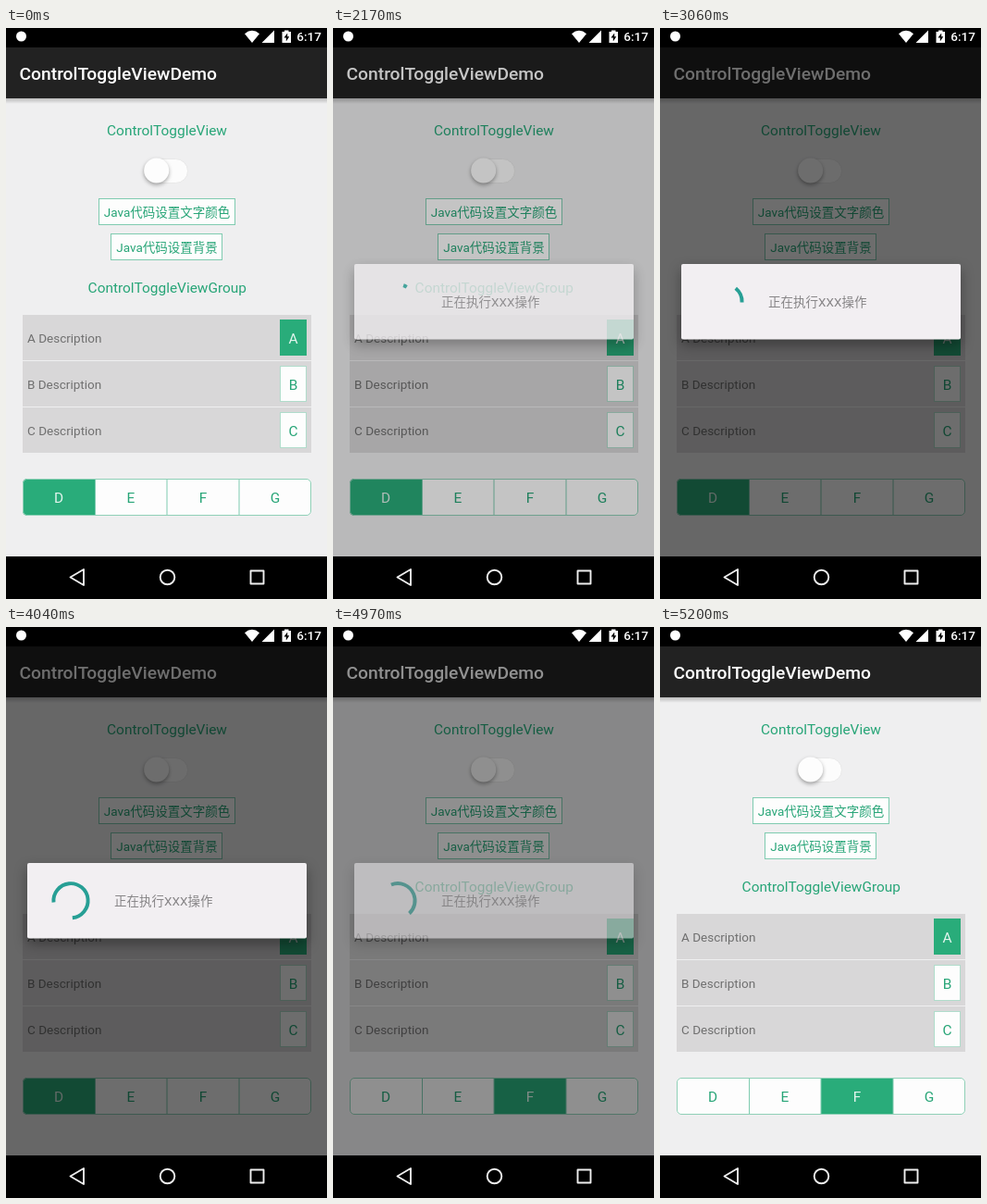
An HTML page that plays this animation: 347 px wide and 617 px high, repeating every 7.81 s.

```html
<!DOCTYPE html>
<html lang="en">
<head>
<meta charset="utf-8">
<title>Toggle demo</title>
<style>
  html, body { margin: 0; width: 100%; height: 100%; overflow: hidden; background: #000; }
  svg { display: block; width: 347px; height: 617px; }
  text { font: 13.5px Roboto, "Noto Sans CJK SC", "Noto Sans CJK", sans-serif; white-space: pre; }
  .big { font-size: 15.43px; }
  .mid { text-anchor: middle; }
  .green { fill: #27a577; }
  .edge { fill: #fdfdfd; stroke: #7fcbb0; }
  .pale { stroke: #b0dccb; }
  .thumb { filter: drop-shadow(0 2px 2px rgba(0, 0, 0, .35)); }
  .card { filter: drop-shadow(0 6px 7px rgba(0, 0, 0, .35)); }
</style>
</head>
<body>
<svg viewBox="0 0 347 617">
  <defs>
    <linearGradient id="fade" x2="0" y2="1">
      <stop stop-color="#000" stop-opacity=".22"/>
      <stop offset="1" stop-color="#000" stop-opacity="0"/>
    </linearGradient>
    <clipPath id="round"><rect x="18" y="487" width="312" height="40" rx="5"/></clipPath>
  </defs>

  <!-- page -->
  <rect width="347" height="617" fill="#efeff0"/>
  <rect y="76" width="347" height="6" fill="url(#fade)"/>
  <rect y="21" width="347" height="55" fill="#222"/>
  <text x="14.5" y="55.5" fill="#fff" style="font-size:19.28px;font-weight:500">ControlToggleViewDemo</text>
  <text class="big mid green" x="174" y="116">ControlToggleView</text>
  <rect x="148.5" y="141.5" width="48" height="26" rx="13" fill="#fcfcfc" stroke="#e8e8e8"/>
  <circle class="thumb" cx="162.7" cy="154" r="13.5" fill="#fdfdfd"/>
  <rect class="edge" x="100.5" y="184.500" width="147" height="28"/>
  <text class="mid green" x="174" y="203.500">Java代码设置文字颜色</text>
  <rect class="edge" x="113.5" y="222.500" width="120" height="28"/>
  <text class="mid green" x="174" y="241.500">Java代码设置背景</text>
  <text class="big mid green" x="174.3" y="286.3">ControlToggleViewGroup</text>
  <g id="rows"></g>
  <g id="tabs" clip-path="url(#round)"></g>
  <rect x="18.5" y="487.5" width="311" height="39" rx="4.5" fill="none" stroke="#8fd0b7"/>

  <!-- dialog -->
  <rect id="dim" y="21" width="347" height="550"/>
  <g id="dialog">
    <rect class="card" x="23" y="255" width="302" height="81.5" rx="2" fill="#f2eff2"/>
    <circle id="arc" cx="70" cy="295.7" r="18.6" pathLength="360" fill="none"
      stroke="#279f95" stroke-width="3.9"/>
    <text x="117" y="300.7" fill="#868486">正在执行XXX操作</text>
  </g>

  <!-- system bars -->
  <rect width="347" height="21"/>
  <rect y="571" width="347" height="46"/>
  <g fill="#fff">
    <circle cx="16.5" cy="9" r="5.5"/>
    <path d="M258 6.2Q266 -.5 274 6.2L266 16Z"/>
    <path d="M290 2.5V16H276.5Z"/>
    <path d="M298.5 4H301V2.5H305.5V4H308V16H298.5Z"/>
    <path d="M304.2 5.5L300.5 10.5H302.8V14.5L306.3 9.2H304.2Z" fill="#000"/>
    <text x="314.3" y="14" style="font-weight:500">6:17</text>
  </g>
  <g fill="none" stroke="#eee" stroke-width="1.9" stroke-linejoin="round" transform="translate(.5 -.5)">
    <path d="M69 594L83.5 585.5V602.5Z"/>
    <circle cx="174" cy="594" r="7.8"/>
    <rect x="264" y="587" width="14" height="14"/>
  </g>
</svg>

<script>
const LOOP = 7810, PRESS = 1970, RELEASE = 2060, OPEN = 2105, SWITCH = 4910, CLOSE = 4925;
const CYCLE = 1333, GREEN = '#29ac7a', WHITE = '#fdfdfd';
const $ = id => document.getElementById(id);
const clamp = x => Math.min(1, Math.max(0, x));

$('rows').innerHTML = [...'ABC'].map((name, i) => {
  const y = 310 + i * 50, on = i === 0;
  return `<rect x="18" y="${y}" width="312" height="49" fill="#d8d7d8"/>
    <text x="23" y="${y + 30}" fill="#707070">${name} Description</text>
    <rect class="edge pale" x="296.5" y="${y + 5.5}" width="28" height="38"
      ${on ? `style="fill:${GREEN};stroke:${GREEN}"` : ''}/>
    <text class="big mid" x="310.5" y="${y + 30.5}" fill="${on ? '#e4f5ee' : '#27a577'}">${name}</text>`;
}).join('');

$('tabs').innerHTML = [...'DEFG'].map((name, i) => {
  const x = 18 + i * 78;
  return `<g><rect x="${x}" y="487" width="78" height="40"/>
    <text class="big mid" x="${x + 39}" y="513">${name}</text></g>`;
}).join('') + [96.5, 174, 252].map(x => `<path d="M${x} 487v40" stroke="#7fcbb0"/>`).join('');
const tabs = [...$('tabs').querySelectorAll('g')];

function setTab(i, on) {
  const [box, label] = tabs[i].children;
  box.setAttribute('fill', on ? GREEN : WHITE);
  label.setAttribute('fill', on ? '#e4f5ee' : '#27a577');
}

// cubic-bezier(.4, 0, .2, 1)
function ease(x) {
  let lo = 0, hi = 1;
  for (let i = 0; i < 24; i++) {
    const s = (lo + hi) / 2, r = 1 - s;
    if (1.2 * r * r * s + .6 * r * s * s + s ** 3 < x) lo = s; else hi = s;
  }
  return lo * lo * (3 - 2 * lo);
}

// The arc's head runs 270° in the first half cycle, its tail follows in the second.
function spin(t) {
  const time = Math.max(0, t - 2045 - 40 * Math.exp((2170 - t) / 200));
  const phase = time / CYCLE % 1;
  const head = 270 * ease(clamp(phase * 2));
  const tail = 270 * ease(clamp(phase * 2 - 1));
  const turn = 4 + 90 * phase + time * 720 / 6665;
  $('arc').setAttribute('stroke-dasharray', `${Math.max(.1, head - tail)} 400`);
  $('arc').setAttribute('transform', `rotate(${tail + turn - 90} 70 295.7)`);
}

function draw(t) {
  setTab(0, t < SWITCH);
  setTab(1, false);
  setTab(2, t >= PRESS && t < RELEASE || t >= SWITCH);
  setTab(3, false);
  const enter = clamp((t - OPEN) / 165);
  const dim = enter * (1 - clamp((t - CLOSE) / 195));
  const show = (1 - (1 - enter) ** 3) * (1 - clamp((t - CLOSE) / 95));
  $('dim').setAttribute('opacity', .57 * dim);
  $('dialog').setAttribute('opacity', show);
  spin(t);
}

const start = performance.now();
function tick() {
  draw((performance.now() - start) % LOOP);
  requestAnimationFrame(tick);
}
tick();
</script>
</body>
</html>
```
